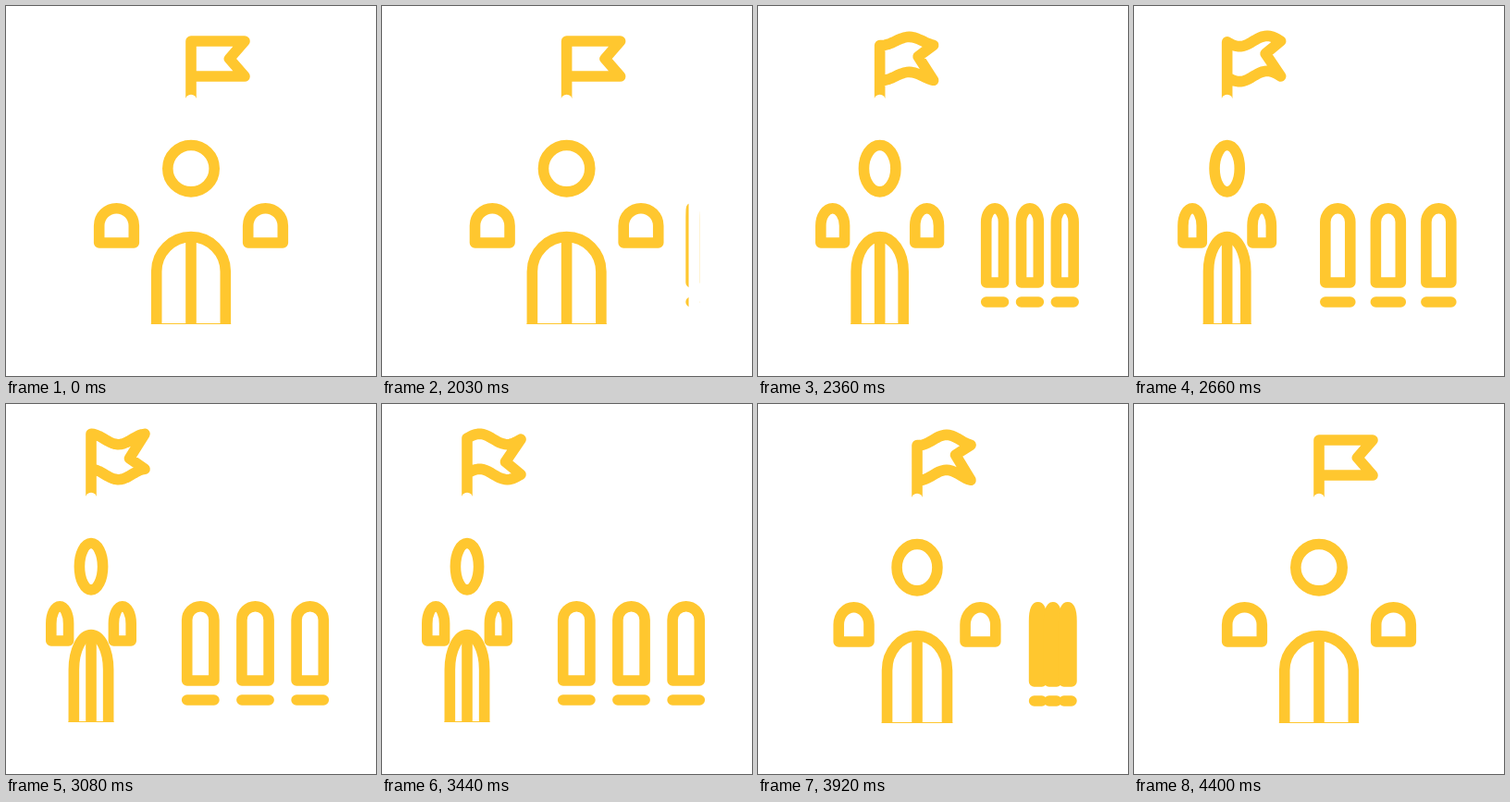
Animation, 400 px wide and 400 px high, one loop 4.43 s. Source, as an HTML page with a canvas:

```html
<!DOCTYPE html>
<html lang="en">
<head>
<meta charset="utf-8">
<title>School building</title>
<style>
html, body { margin: 0; width: 100%; height: 100%; overflow: hidden; background: #fff; }
canvas { display: block; width: 100vw; height: 100vh; }
</style>
</head>
<body>
<canvas id="stage" width="400" height="400"></canvas>
<script>
const ctx = document.getElementById('stage').getContext('2d');
const YELLOW = '#ffc72f';
const LINE = 11.6;
const LOOP = 4430, HOLD = 2030, STEP = 30;

const clamp = v => Math.min(1, Math.max(0, v));
const mix = (a, b, k) => a + (b - a) * k;
const smooth = (from, to, t) => {
  const k = clamp((t - from) / (to - from));
  return k * k * (3 - 2 * k);
};

// Cubic bezier easing (.2, 0, .2, 1), solved by bisection.
function ease(x) {
  x = clamp(x);
  let lo = 0, hi = 1;
  for (let i = 0; i < 24; i++) {
    const s = (lo + hi) / 2;
    const bx = .6 * s * (1 - s) + s * s * s;
    if (bx < x) lo = s; else hi = s;
  }
  return lo * lo * (3 - 2 * lo);
}

function turnAt(t) {
  if (t < HOLD) return 0;
  const away = ease((t - 2010) / 1000);
  const back = Math.min(1, ease((t - 3494) / 1000) * 1.006);
  return away * (1 - back);
}

function strokePath(build, cap = 'butt') {
  ctx.lineCap = cap;
  ctx.beginPath();
  build();
  ctx.stroke();
}

// Upright opening with an elliptical arch on top.
function arch(x, halfWidth, top, spring, bottom, closed) {
  strokePath(() => {
    ctx.moveTo(x - halfWidth, bottom);
    ctx.lineTo(x - halfWidth, spring);
    ctx.ellipse(x, spring, halfWidth, spring - top, 0, Math.PI, 2 * Math.PI);
    ctx.lineTo(x + halfWidth, bottom);
    if (closed) ctx.closePath();
  });
}

function drawFlag(x, t) {
  const amp = 5.7 * smooth(2000, 2500, t) * (1 - smooth(3920, 4320, t));
  const phase = -.2 - .00403 * (t - 2360);
  const point = (u, y) => ctx.lineTo(x + 58 * u, y + amp * Math.cos(6.1 * u + phase));
  strokePath(() => {
    ctx.moveTo(x, 100);
    for (let i = 0; i <= 20; i++) point(i / 20, 38);
    point(.715, 57);
    for (let i = 20; i >= 0; i--) point(i / 20, 76);
  });
  ctx.fillStyle = '#fff';
  ctx.beginPath();
  ctx.arc(x, 102, 6.2, 0, 2 * Math.PI);
  ctx.fill();
}

function drawFront(x, turn) {
  const spread = 80.5 * (1 - .58 * turn);
  const width = 1 - .5 * turn;

  strokePath(() => ctx.ellipse(x, 175.7, 25.2 * width, 25.2, 0, 0, 2 * Math.PI));
  for (const side of [-1, 1]) {
    arch(x + side * spread, 18.8 * width, 218.7, 237.5, 256, true);
  }
  arch(x, 37.3 * width, 249.6, 287, 344, false);
  strokePath(() => {
    ctx.moveTo(x, 250);
    ctx.lineTo(x, 344);
  });
  const half = 37.3 * width + LINE / 2;
  ctx.fillStyle = YELLOW;
  ctx.fillRect(x - half, 343, 2 * half, 1);
}

function drawSide(turn) {
  const middle = mix(336, 269.5, turn);
  const gap = mix(1, 59.2, turn);
  const half = mix(.4, 14.6, turn);
  for (let i = -1; i <= 1; i++) {
    const x = middle + i * gap;
    arch(x, half, 218.7, 233.5, 299, true);
    strokePath(() => {
      ctx.moveTo(x - half, 320);
      ctx.lineTo(x + half, 320);
    }, 'round');
  }
  // The white wall edge hides the windows at the start of the turn.
  ctx.fillStyle = '#fff';
  ctx.fillRect(330.5 + 300 * turn, 205, 11.5, 130);
}

function draw(t) {
  const turn = turnAt(t);
  const x = mix(200, 92, turn);
  ctx.setTransform(1, 0, 0, 1, 0, 0);
  ctx.fillStyle = '#fff';
  ctx.fillRect(0, 0, 400, 400);
  ctx.translate(0, smooth(3500, 3800, t));
  ctx.strokeStyle = YELLOW;
  ctx.lineWidth = LINE;
  ctx.lineJoin = 'round';
  if (turn > 0) drawSide(turn);
  drawFront(x, turn);
  drawFlag(x, t);
}

const start = performance.now();
function frame() {
  const t = (performance.now() - start) % LOOP;
  draw(t < HOLD ? 0 : HOLD + Math.floor((t - HOLD) / STEP) * STEP);
  requestAnimationFrame(frame);
}
frame();
</script>
</body>
</html>
```
